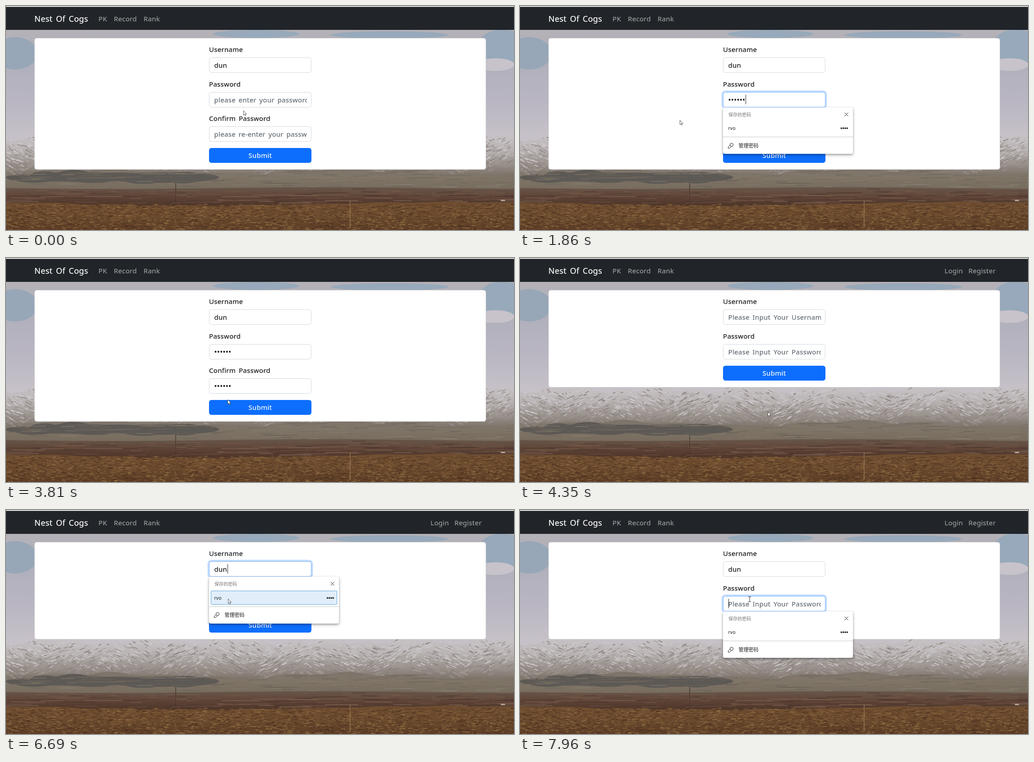
Animation, 1126 px wide and 497 px high, one loop 8 s. Source, as an HTML page with a canvas:

```html
<!DOCTYPE html>
<html lang="en">
<head>
<meta charset="utf-8">
<title>Account form</title>
<style>
html, body { margin: 0; width: 100%; height: 100%; overflow: hidden; }
body { position: relative; font: 15px/22px "Noto Sans", sans-serif; letter-spacing: .3px; word-spacing: 2.5px; color: #16191c; -webkit-text-stroke: .2px; }
body *, body *::before { position: absolute; box-sizing: border-box; white-space: pre; }
canvas { left: 0; top: 0; }
nav { left: 0; top: 0; width: 1126px; height: 52.5px; background: #212529; border-top: 2px solid #dfe3df; color: #9b9d9f; }
nav span { top: 15px; }
nav .brand { left: 63px; font-size: 18px; color: #fff; }
#account { left: 0; top: 0; }
#card { left: 63px; top: 70.5px; width: 1001px; background: #fff; border: 1px solid #dedcdc; border-radius: 5px; }
.field { left: 450px; width: 227px; height: 64px; }
.field label { left: 0; top: 0; }
.input { left: 0; top: 29px; width: 227px; height: 34px; border: 1px solid #d3d8dd; border-radius: 5.5px; background: #fff; }
.input.focus { border-color: #86b7fe; box-shadow: 0 0 0 3.4px #c2dbfe; }
.text { left: 10.5px; top: 5px; width: 205px; height: 22px; overflow: hidden; }
.text span { position: static; }
.hint { color: #636c75; }
.dots { font-size: 16px; }
.caret { left: 0; top: 0; width: 1px; height: 21px; background: #212529; }
#submit { left: 450px; width: 227px; height: 33px; border-radius: 5.5px; background: #0d6efd; color: #fff; text-align: center; line-height: 33px; }
#submit.hover { background: #0b5ed7; }
#popup { left: 450px; width: 287.5px; height: 103.5px; background: #fff; border-radius: 3px 3px 4px 4px; box-shadow: 0 2px 5px rgba(0,0,0,.35), 0 4px 8px rgba(0,0,0,.1);
  font: 10.5px/16px "Noto Sans", "Noto Sans CJK SC", "Noto Sans CJK", sans-serif; letter-spacing: 0; color: #1b1b1b; -webkit-text-stroke: 0; }
#popup .title { left: 12px; top: 8px; font-size: 10px; color: #767676; }
#popup .row { left: 3.5px; top: 31px; width: 280px; height: 30.5px; border: 1px solid transparent; border-radius: 2px; }
#popup .row.hover { background: #e1eefa; border-color: #5fa6da; }
#popup .row span { left: 7px; top: 6.5px; }
#popup .row .mask { left: auto; right: 6px; font-size: 15px; letter-spacing: -1.4px; }
#popup .rule { left: 0; top: 65.5px; width: 100%; height: 1px; background: #c8c8c8; }
#popup .manage { left: 34.5px; top: 77px; font-size: 11px; }
svg { left: 0; top: 0; overflow: visible; }
</style>
</head>
<body>
<canvas id="scene" width="1126" height="497"></canvas>
<nav>
  <span class="brand">Nest Of Cogs</span>
  <span style="left:205px">PK</span><span style="left:239px">Record</span><span style="left:305px">Rank</span>
  <div id="account"><span style="left:941px">Login</span><span style="left:994px">Register</span></div>
</nav>
<div id="card"></div>
<div id="submit">Submit</div>
<div id="popup">
  <span class="title">保存的密码</span>
  <div class="row"><span>rvo</span><span class="mask">••••</span></div>
  <div class="rule"></div>
  <span class="manage">管理密码</span>
  <svg width="288" height="104" fill="none" stroke="#222">
    <path d="M269.5 11.5l8 8m0-8l-8 8"/>
    <path d="M16 83.5l-4.5 4.5v2.5h3l4-4"/>
    <circle cx="19" cy="83" r="3.6"/>
  </svg>
</div>
<svg id="pointer" width="12" height="16">
  <path id="arrow" d="M.5 .5v9.6l2.2-2 1.5 3.3 1.6-.7-1.5-3.2h3z" fill="#fff" stroke="#333" stroke-width=".8"/>
  <path id="beam" d="M-3-5.5h2.2l.8.6.8-.6H3M-3 5.5h2.2l.8-.6.8.6H3M0-5V5" fill="none" stroke="#333"/>
</svg>
<script>
const LOOP = 8000;
const TICK = 142; // the picture advances in ticks, as in a screen capture
const TICK_LEAD = 25;
const SUBMIT_TICK = 30;
const USER = 'dun';
const LABELS = { name: 'Username', pass: 'Password', confirm: 'Confirm Password' };
const KEYS = Object.keys(LABELS);
const HINTS = {
  register: { pass: 'please enter your password', confirm: 'please re-enter your password' },
  login: { name: 'Please Input Your Username', pass: 'Please Input Your Password' }
};

// Pointer moves, in ticks
const HOME = { x: 526, y: 232 };
const MOVES = [
  { from: 0, to: 3, x: 534, y: 209 },
  { from: 9, to: 13, x: 354, y: 253 },
  { from: 13, to: 17, x: 577, y: 290 },
  { from: 22, to: 25, x: 384, y: 310 },
  { from: 25, to: 27, x: 491, y: 314 },
  { from: 27, to: 30, x: 549, y: 341 },
  { from: 31, to: 35, x: 516, y: 134 },
  { from: 37, to: 42, x: 492, y: 197 },
  { from: 48, to: 52, x: 21, y: 240 },
  { from: 52, to: 56, x: 509, y: 198 }
];
const FOCUS = [
  { key: 'pass', from: 3, to: 14 },
  { key: 'confirm', from: 17, to: 25 },
  { key: 'name', from: 36, to: 52 },
  { key: 'pass', from: 56, to: 99 }
];

const $ = id => document.getElementById(id);
const clamp = (v, max) => Math.max(0, Math.min(max, v));
const within = (v, from, size) => v >= from && v <= from + size;
const show = (element, on) => { element.style.display = on ? '' : 'none'; };
const fieldTop = key => 85 + 76.5 * KEYS.indexOf(key);

const fields = {};
for (const key of KEYS) {
  const box = document.createElement('div');
  box.className = 'field';
  box.style.top = fieldTop(key) + 'px';
  box.innerHTML = `<label>${LABELS[key]}</label><div class="input"><div class="text"><span></span><i class="caret"></i></div></div>`;
  document.body.insertBefore(box, $('submit'));
  fields[key] = { box, input: box.querySelector('.input'), text: box.querySelector('span'), caret: box.querySelector('i') };
}

function pointerAt(tick) {
  let { x, y } = HOME;
  for (const move of MOVES) {
    const p = clamp((tick - move.from) / (move.to - move.from), 1);
    const eased = p * p * (3 - 2 * p);
    x += (move.x - x) * eased;
    y += (move.y - y) * eased;
  }
  return { x, y };
}

function valuesAt(tick) {
  if (tick >= SUBMIT_TICK) return { name: USER.slice(0, clamp(tick - 43, USER.length)), pass: '', confirm: '' };
  const typed = since => '•'.repeat(clamp(tick - since, 6));
  return { name: USER, pass: typed(3), confirm: typed(18) };
}

function drawField(key, value, hint, focused) {
  const { input, text, caret } = fields[key];
  input.classList.toggle('focus', focused);
  text.textContent = value || hint || '';
  text.className = !value ? 'hint' : key === 'name' ? '' : 'dots';
  show(caret, focused);
  caret.style.left = (value ? text.offsetWidth : 0) + 'px';
}

function draw(tick) {
  const login = tick >= SUBMIT_TICK;
  const active = login ? KEYS.slice(0, 2) : KEYS;
  const focus = FOCUS.find(f => tick >= f.from && tick < f.to)?.key;
  const values = valuesAt(tick);
  const { x, y } = pointerAt(tick);

  show($('account'), login);
  $('card').style.height = 63 + 76.5 * active.length + 'px';
  $('submit').style.top = 85.5 + 76.5 * active.length + 'px';
  $('submit').classList.toggle('hover', !login && tick >= SUBMIT_TICK - 2);
  for (const key of KEYS) {
    show(fields[key].box, active.includes(key));
    drawField(key, values[key], HINTS[login ? 'login' : 'register'][key], key === focus);
  }

  const popupTop = focus ? fieldTop(focus) + 63 : 0;
  show($('popup'), focus);
  $('popup').style.top = popupTop + 'px';
  const overPopup = focus && within(x, 450, 287) && within(y, popupTop, 103);
  document.querySelector('.row').classList.toggle('hover', !!overPopup && within(y, popupTop + 31, 30));

  const overInput = !overPopup && within(x, 450, 227) && active.some(key => within(y, fieldTop(key) + 29, 34));
  show($('beam'), overInput);
  show($('arrow'), !overInput);
  $('pointer').style.transform = `translate(${x}px, ${y}px)`;
}

function paintScene() {
  const c = $('scene').getContext('2d');
  let seed = 7;
  const rand = () => (seed = seed * 16807 % 2147483647) / 2147483647;
  const pick = colors => colors[Math.floor(rand() * colors.length)];
  const gradient = (y0, y1, ...colors) => {
    const g = c.createLinearGradient(0, y0, 0, y1);
    colors.forEach((color, i) => g.addColorStop(i / (colors.length - 1), color));
    return g;
  };
  const land = (fill, height) => {
    c.fillStyle = fill;
    c.beginPath();
    c.moveTo(0, 497);
    for (let x = 0; x <= 1128; x += 4) c.lineTo(x, height(x));
    c.lineTo(1128, 497);
    c.fill();
  };
  const blob = (color, x, y, rx, ry) => {
    c.fillStyle = color;
    c.beginPath();
    c.ellipse(x, y, rx, ry, 0, 0, 7);
    c.fill();
  };
  const specks = (count, top, height, length, colors) => {
    for (let i = 0; i < count; i++) {
      const depth = rand();
      c.fillStyle = pick(colors);
      c.fillRect(rand() * 1140 - 14, top + depth * height, length * (.2 + rand()), .8 + rand() * (.4 + depth));
    }
  };

  c.fillStyle = gradient(53, 290, '#b4b1b7', '#b0b0bc', '#b9b6c2', '#c6c1c8');
  c.fillRect(0, 0, 1126, 300);
  blob('#97a7b7', 20, 105, 50, 36);
  blob('#97a9ba', 555, 62, 95, 9);
  blob('#97a9ba', 850, 64, 130, 8);
  blob('#97a9bb', 1100, 92, 55, 40);
  blob('#c8c3ca', 1085, 130, 42, 14);

  const ridge = x => 291 + 5 * Math.sin(x / 31 + 1) + 4 * Math.sin(x / 13) + 2 * Math.sin(x / 5);
  land(gradient(288, 375, '#c6c1c4', '#b9b3b3', '#9c948f', '#7d746a'), ridge);
  // Rock and snow follow the slopes on both sides of each spur.
  for (let i = 0; i < 2200; i++) {
    const x = rand() * 1126, depth = rand();
    const side = Math.sin(x / 38 + depth * 2) > 0 ? 1 : -1;
    const length = 3 + rand() * 10;
    const rocky = rand() < .25 + depth * .45;
    c.strokeStyle = rocky ? pick(['#8a827e', '#9f9794']) : depth > .75 ? '#a39b95' : '#cbc6c9';
    c.lineWidth = .7 + rand() * 1.4;
    c.beginPath();
    c.moveTo(x, ridge(x) + 3 + depth * 70);
    c.lineTo(x + side * length, ridge(x) + 3 + depth * 70 + length * .45);
    c.stroke();
  }
  land(gradient(358, 405, '#7d746b', '#7f7567', '#776c5e'), x => 368 + 6 * Math.sin(x / 83 + 2) + 3 * Math.sin(x / 21));
  for (let x = 40; x < 430; x += 22) blob('#5d5955', x, 377 + rand() * 6, 30 + rand() * 30, 6 + rand() * 8);
  specks(130, 365, 36, 60, ['#746a60', '#867c6d', '#6c645a']);

  land(gradient(402, 440, '#66574b', '#604638', '#50372b'), x => 404 + 2 * Math.sin(x / 150));
  specks(170, 405, 32, 70, ['#735a4a', '#4d3830', '#694d3f']);
  land(gradient(435, 497, '#6f4e31', '#6b4a2e', '#5c3e26'), x => 439 + 4 * Math.sin(x / 170 - 1) + Math.sin(x / 23));
  specks(3200, 439, 58, 9, ['#4d3220', '#7f5d38', '#8b6940', '#593b25']);

  c.fillStyle = '#4b3930';
  c.fillRect(375.5, 393, 1.5, 46);
  c.fillRect(319.5, 424, 1.5, 12);
  c.fillStyle = '#987650';
  c.fillRect(762, 432, 1.5, 57);
  c.fillStyle = '#b4a69a';
  c.fillRect(1097, 430, 9, 3);
}

paintScene();
const start = performance.now();
let shown;
function frame() {
  const t = (performance.now() - start) % LOOP;
  const tick = Math.floor((t + TICK_LEAD) / TICK);
  if (tick !== shown) draw(shown = tick);
  requestAnimationFrame(frame);
}
frame();
</script>
</body>
</html>
```
